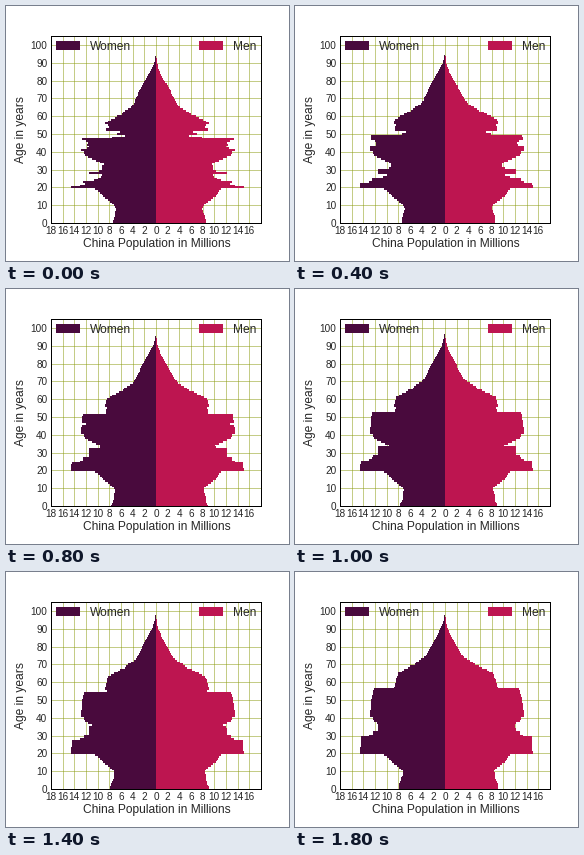
These frames come from a looping animation (283x255 px, 2 s). A matplotlib script:

```python
import numpy as np
import matplotlib.pyplot as plt
from matplotlib.animation import FuncAnimation
from matplotlib.patches import Rectangle

W, H, DPI = 283, 255, 64
FRAMES, STEP_MS = 10, 200
WOMEN, MEN, GRID, INK = "#490A3D", "#BD1550", "#8A9B0F", "#262626"
LEFT, RIGHT, TOP, BOTTOM = 45, 255, 30, 217
MAX_AGE = 100

plt.rcParams["font.family"] = "Liberation Sans"


def pt(px):
    return px * 72 / DPI


# Women by single year of age at the start, in millions; smooth above 62.
YOUNG = [
    7.3, 7.3, 7.25, 7.15, 7.1, 7.0, 6.95, 6.85, 6.85, 6.95,
    7.2, 7.5, 7.9, 8.3, 8.7, 9.1, 9.3, 9.6, 10.0, 10.45,
    14.55, 13.1, 12.2, 12.5, 10.7, 9.9, 9.4, 9.3, 11.55, 9.7,
    9.2, 9.2, 9.3, 9.0, 9.6, 10.3, 10.9, 11.6, 12.2, 12.3,
    12.4, 12.9, 11.9, 11.4, 11.8, 11.6, 12.0, 12.75, 7.5, 5.4,
    6.7, 6.1, 8.6, 8.5, 8.1, 8.3, 8.75, 8.2, 7.8, 7.1,
    6.7, 5.9, 5.7,
]
OLD_AGE = [63, 65, 67, 70, 75, 78, 80, 82, 85, 88, 90, 93, 96]
OLD_POP = [5.3, 4.3, 3.8, 3.4, 2.8, 2.3, 1.9, 1.5, 0.95, 0.5, 0.3, 0.1, 0]
RATIO_AGE = [0, 6, 17, 20, 28, 48, 58, 65, 75, 85]
RATIO = [1.175, 1.17, 1.11, 1.033, 1.06, 1.05, 1.04, 0.96, 0.84, 0.65]

ages = np.arange(MAX_AGE + 1)
hazard = 0.0009 + 0.0035 * np.exp((ages - 50) * 0.09)


def cumulative_pyramids(start, births, deaths):
    """Age the cohorts year by year, keeping the widest bar reached so far."""
    pop, widest, years = start.copy(), start.copy(), [start]
    for year in range(1, FRAMES):
        pop = np.r_[births[year], pop[:-1] * np.exp(-deaths[:-1])]
        widest = np.maximum(widest, pop)
        years.append(widest)
    return years


women_start = np.r_[YOUNG, np.interp(ages[len(YOUNG):], OLD_AGE, OLD_POP)]
men_start = women_start * np.interp(ages, RATIO_AGE, RATIO)
year = np.arange(FRAMES)
births = 7.3 + 0.12 * np.clip(year - 1, 0, 5) - 0.1 * np.clip(year - 6, 0, 3)
women = cumulative_pyramids(women_start, births, hazard)
men = cumulative_pyramids(men_start, births * 1.155, hazard * 1.2)

fig = plt.figure(figsize=(W / DPI, H / DPI), dpi=DPI, facecolor="white")
ax = fig.add_axes([LEFT / W, 1 - BOTTOM / H,
                   (RIGHT - LEFT) / W, (BOTTOM - TOP) / H])
ax.set(xlim=(-18, 18), ylim=(0, 105))
ticks = np.arange(-18, 18, 2)
ax.set_xticks(ticks, [str(abs(t)) for t in ticks])
ax.set_yticks(range(0, 101, 10))
ax.tick_params(length=0, labelsize=pt(10), labelcolor=INK, pad=pt(3.5))
ax.set_axisbelow(True)
ax.grid(color=GRID, lw=pt(0.5))
for spine in ax.spines.values():
    spine.set(color="black", lw=pt(1))

women_bars = ax.barh(ages, -women[0], height=1, color=WOMEN, lw=0)
men_bars = ax.barh(ages, men[0], height=1, color=MEN, lw=0)


def label(x, y, text, **kw):
    fig.text(x / W, 1 - y / H, text, size=pt(12), color=INK, **kw)


def legend_key(x, color, text):
    fig.add_artist(Rectangle((x / W, 1 - 44 / H), 24 / W, 9 / H,
                             color=color, lw=0))
    label(x + 34, 44.5, text, va="baseline")


legend_key(50, WOMEN, "Women")
legend_key(193, MEN, "Men")
label(150.5, 241.5, "China Population in Millions", ha="center", va="baseline")
label(15, 124, "Age in years", ha="center", va="center", rotation=90)


def draw(i):
    for bar, width in zip(women_bars, women[i]):
        bar.set_width(-width)
    for bar, width in zip(men_bars, men[i]):
        bar.set_width(width)
    return [*women_bars, *men_bars]


anim = FuncAnimation(fig, draw, frames=FRAMES, interval=STEP_MS,
                     repeat=True, repeat_delay=0)
plt.show()
```
